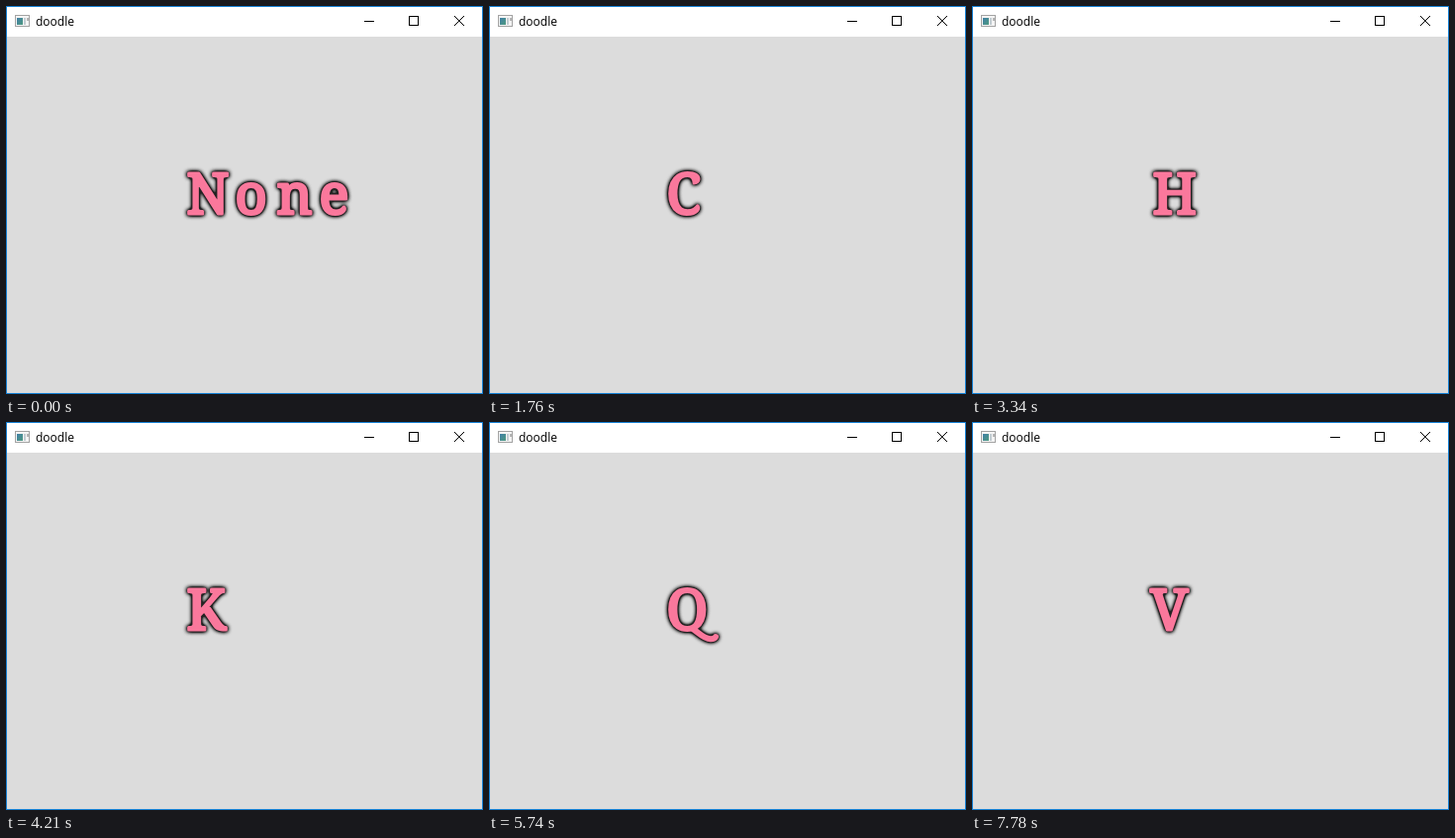
These frames come from a looping animation (482x392 px, 8 s). An HTML page:

```html
<!DOCTYPE html>
<html lang="en">
<head>
<meta charset="utf-8">
<title>doodle</title>
<style>
  html, body { margin: 0; width: 100%; height: 100%; overflow: hidden; background: #dcdcdc; }
  svg { display: block; }
  .title { font: 12px "Open Sans", "Noto Sans", sans-serif; fill: #000; }
  .line { fill: none; stroke: #000; }
  #word { fill: #fa789c; stroke: #fa789c; stroke-width: 3; stroke-linejoin: round; stroke-linecap: round; }
  #letters { font: 56px "Noto Serif", serif; }
  #tail { fill: none; stroke-width: 6; }
</style>
</head>
<body>
<svg width="482" height="392" viewBox="0 0 482 392">
  <defs>
    <linearGradient id="teal" x2="1" y2="1">
      <stop stop-color="#3f7fa6"/><stop offset="1" stop-color="#4f9a80"/>
    </linearGradient>
    <filter id="halo" filterUnits="userSpaceOnUse" x="160" y="150" width="210" height="90" color-interpolation-filters="sRGB">
      <feGaussianBlur in="SourceAlpha" stdDeviation="2"/>
      <feComponentTransfer result="spread"><feFuncA type="linear" slope="2.8"/></feComponentTransfer>
      <feFlood flood-color="#222"/>
      <feComposite in2="spread" operator="in" result="shade"/>
      <feMerge><feMergeNode in="shade"/><feMergeNode in="SourceGraphic"/></feMerge>
    </filter>
  </defs>

  <rect width="482" height="392" fill="#dcdcdc"/>
  <rect width="482" height="31" fill="#fff"/>
  <rect x=".5" y=".5" width="481" height="391" fill="none" stroke="#1883d7"/>

  <g shape-rendering="crispEdges">
    <rect x="9.5" y="9.5" width="14" height="11" fill="#f4f4f4" stroke="#a3a3a3"/>
    <rect x="11" y="12" width="6" height="7" fill="url(#teal)"/>
    <rect x="18" y="12" width="2" height="7" fill="#c4cdd2"/>
    <rect x="21" y="12" width="2" height="3" fill="#b5b5b5"/>
  </g>
  <text class="title" x="30" y="20">doodle</text>
  <path class="line" shape-rendering="crispEdges" d="M362 15.5h10M407.5 10.5h9v9h-9z"/>
  <path class="line" d="M453 10l10 10M463 10l-10 10"/>

  <g id="word" filter="url(#halo)">
    <text id="letters" y="210"></text>
    <path id="tail" d="M206 209C212 213 217 219 224 219.3Q228 219.3 229 217"/>
    <path id="splayed"/>
  </g>
</svg>
<script>
  const LOOP = 8000, BASE_LEFT = 183, EDGE = 1.5;

  // Start time, shown text, left ink edge of each character
  const steps = [
    [0, "None", 183, 233, 273, 318],
    [890, "A", 178.5], [1200, "B"], [1760, "C", 181], [2140, "D"],
    [2450, "E"], [2680, "F"], [2910, "G", 181], [3340, "H"],
    [3700, "I"], [3980, "J", 179.5], [4210, "K"], [4440, "L"],
    [4770, "M"], [4950, "N"], [5230, "O", 181], [5460, "P"],
    [5740, "Q", 181], [5970, "R"], [6660, "S"], [7040, "T", 180.5],
    [7350, "U", 181], [7780, "V", 179]
  ];

  const byId = id => document.getElementById(id);
  const letters = byId("letters"), tail = byId("tail"), splayed = byId("splayed");
  const pen = document.createElement("canvas").getContext("2d");
  pen.font = '56px "Noto Serif", serif';

  const originFor = (char, left) =>
    left + EDGE + pen.measureText(char).actualBoundingBoxLeft;

  // The wide M is built from its left half, mirrored about its centre
  const centre = 208;
  const half = [
    [208, 196], [199, 170.5], [183.5, 170.5], [183.5, 173], [188.5, 173.5],
    [186.5, 207], [181.5, 207.5], [181.5, 210], [195.5, 210], [195.5, 207.5],
    [191.5, 207], [193.3, 180], [204.5, 208]
  ];
  const mirrored = half.map(([x, y]) => [2 * centre - x, y]).reverse();
  splayed.setAttribute("d", "M" + half.concat(mirrored).join("L") + "Z");

  function show([, text, ...lefts]) {
    const glyphs = text === "Q" ? "O" : text === "M" ? "" : text;
    letters.textContent = glyphs;
    letters.setAttribute("x",
      [...glyphs].map((char, i) => originFor(char, lefts[i] ?? BASE_LEFT)).join(" "));
    tail.style.display = text === "Q" ? "" : "none";
    splayed.style.display = text === "M" ? "" : "none";
  }

  let current;
  const start = performance.now();
  function tick(now) {
    const time = Math.max(0, now - start) % LOOP;
    const step = steps.findLast(([at]) => at <= time);
    if (step !== current) show(current = step);
    requestAnimationFrame(tick);
  }
  tick(start);
</script>
</body>
</html>
```
